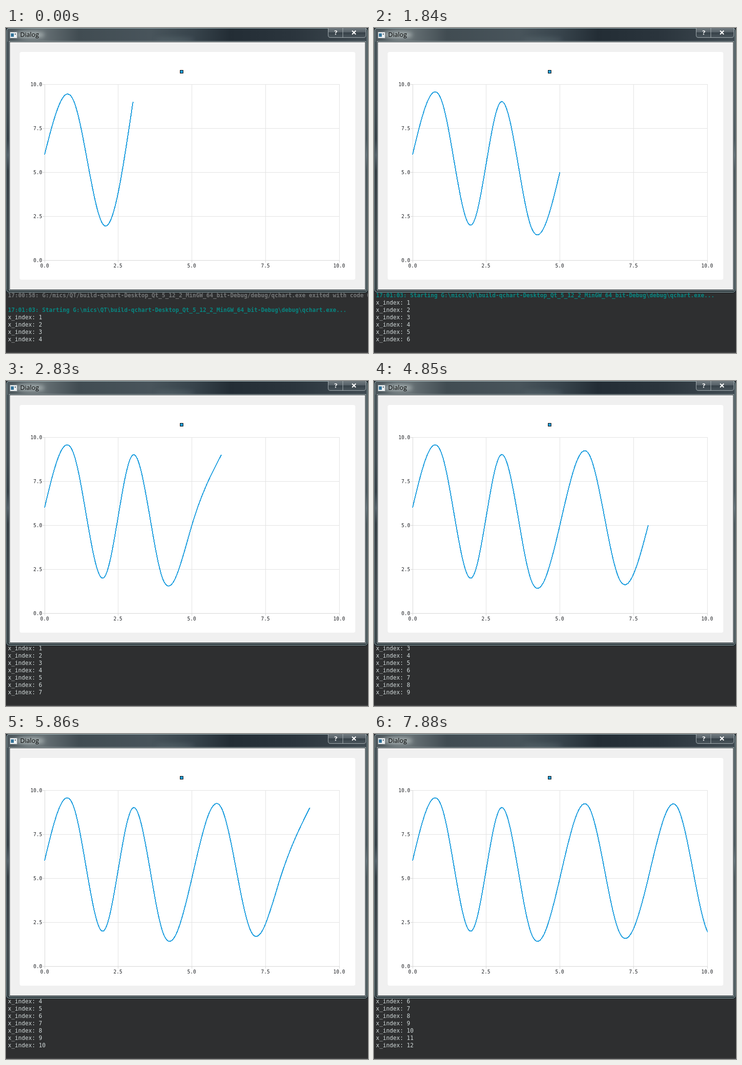
An HTML page that plays this animation: 741x665 px, repeating every 8 s.

```html
<!DOCTYPE html>
<html lang="en">
<head>
<meta charset="utf-8">
<title>Dialog</title>
<style>
  html, body { margin: 0; width: 100%; height: 100%; overflow: hidden; background: #2e2f30; }
  svg { display: block; }
  text { white-space: pre; }
  .log { font: 11.63px "DejaVu Sans Mono", monospace; fill: #d0d8d8; }
  .log .exit { font-weight: bold; fill: #747677; }
  .log .start { font-weight: bold; fill: #078681; }
  .axis text { font: 10px "DejaVu Sans Mono", monospace; fill: #202226; }
  .crisp { shape-rendering: crispEdges; }
</style>
</head>
<body>
<svg width="741" height="665" viewBox="0 0 741 665">
  <defs>
    <linearGradient id="titleGlass">
      <stop offset="0" stop-color="#4b565b"/>
      <stop offset=".1" stop-color="#667074"/>
      <stop offset=".2" stop-color="#414c52"/>
      <stop offset=".4" stop-color="#48545b"/>
      <stop offset=".52" stop-color="#37434b"/>
      <stop offset=".62" stop-color="#232d35"/>
      <stop offset=".8" stop-color="#2b353d"/>
      <stop offset="1" stop-color="#404b52"/>
    </linearGradient>
    <linearGradient id="sideGlass" x2="0" y2="1">
      <stop offset="0" stop-color="#3d484e"/>
      <stop offset=".3" stop-color="#333d43"/>
      <stop offset=".42" stop-color="#262f36"/>
      <stop offset=".48" stop-color="#49545c"/>
      <stop offset=".54" stop-color="#262e34"/>
      <stop offset=".8" stop-color="#343b40"/>
      <stop offset="1" stop-color="#2c373b"/>
    </linearGradient>
    <linearGradient id="button" x2="0" y2="1">
      <stop offset="0" stop-color="#737d82"/>
      <stop offset=".48" stop-color="#566067"/>
      <stop offset=".5" stop-color="#364148"/>
      <stop offset="1" stop-color="#4a555c"/>
    </linearGradient>
    <filter id="blur" x="-50%" y="-200%" width="200%" height="500%"><feGaussianBlur stdDeviation="4"/></filter>
    <filter id="softBlur" x="-50%" y="-200%" width="200%" height="500%"><feGaussianBlur stdDeviation="2"/></filter>
    <clipPath id="titleClip"><rect x="2" y="2" width="737" height="25"/></clipPath>
    <clipPath id="plotClip"><rect x="78" y="114" width="605" height="362"/></clipPath>
  </defs>

  <rect width="741" height="665" fill="#2e2f30"/>
  <rect y="663" width="741" height="2" fill="#414243"/>
  <g class="log" id="log"></g>

  <!-- Window frame: dark and light hairlines around the glass and the client area -->
  <rect width="741" height="542" fill="#242b30"/>
  <rect x=".5" y="-.5" width="740" height="542" rx="6" fill="url(#sideGlass)" stroke="#1a2125"/>
  <rect x="2" y="1" width="737" height="27" fill="url(#titleGlass)"/>
  <g clip-path="url(#titleClip)">
    <g filter="url(#blur)">
      <ellipse cx="49" cy="14" rx="30" ry="8" fill="#abb4b6" opacity=".85"/>
      <ellipse cx="345" cy="24" rx="40" ry="5" fill="#637078" opacity=".4"/>
    </g>
    <g filter="url(#softBlur)">
      <path d="M125 2H290" stroke="#20282d" stroke-width="9"/>
      <path d="M135 2H170M178 2H215M222 2H280" stroke="#aab1b4" stroke-width="3"/>
    </g>
  </g>
  <rect x="1.5" y=".5" width="738" height="540" rx="5" fill="none" stroke="#a3b9bb"/>
  <rect x="7.5" y="28.5" width="728" height="507" fill="#f0f0f0" stroke="#1d2529"/>
  <rect x="6.5" y="27.5" width="730" height="509" fill="none" stroke="#b4c0c2"/>

  <g class="crisp">
    <rect x="8" y="8" width="14" height="12" fill="#eef1f2" stroke="#a8b1b5"/>
    <rect x="10" y="11" width="6" height="7" fill="#337399"/>
    <rect x="18" y="11" width="2" height="3" fill="#63717a"/>
  </g>
  <text x="29" y="18" font-size="13" font-family="'Open Sans', sans-serif" fill="#000">Dialog</text>

  <path d="M659.5 -1V15Q659.5 19.5 664 19.5H732Q736.5 19.5 736.5 15V-1Z" fill="url(#button)" stroke="#a2abaf"/>
  <path d="M689.5 0V19" stroke="#a2abaf"/>
  <text x="675" y="14" text-anchor="middle" font-size="13" font-weight="700" font-family="'Open Sans', sans-serif" fill="#fff">?</text>
  <path d="M708.5 5.5L716 13M716 5.5L708.5 13" stroke="#fff" stroke-width="2.3"/>

  <!-- Chart -->
  <rect x="28" y="49" width="687" height="466" rx="4" fill="#fff"/>
  <rect class="crisp" x="356.5" y="86.5" width="6" height="6" fill="#209fdf" stroke="#000"/>
  <g class="axis" id="axis"></g>
  <path id="curve" class="crisp" clip-path="url(#plotClip)" fill="none" stroke="#209fdf" stroke-width="2"/>
</svg>
<script>
const values = [6, 9, 2, 9, 2, 5, 9, 2, 5, 9, 2, 5];
const stepTimes = [830, 1840, 2830, 3840, 4850, 5860, 6940, 7880];
const firstCount = 4, loop = 8000;
const build = 'build-qchart-Desktop_Qt_5_12_2_MinGW_64_bit-Debug';
const header = [
  ['exit', `17:00:58: G:/mics/QT/${build}/debug/qchart.exe exited with code 0`],
  ['', ''],
  ['start', `17:01:03: Starting G:\\mics\\QT\\${build}\\debug\\qchart.exe...`]
];
const byId = id => document.getElementById(id);
const px = x => 79 + 60.3 * x;
const py = y => 475 - 36 * y;

function buildAxes() {
  let grid = '', axes = '', labels = '';
  for (let i = 0; i < 5; i++) {
    const value = i * 2.5, text = value.toFixed(1);
    const x = Math.floor(px(value)) + .5, y = py(value) + .5;
    grid += `M${x} 115V475M79 ${y}H682`;
    axes += `M${x} 475V480M75 ${y}H79`;
    labels += `<text x="${x - .5}" y="490" text-anchor="middle">${text}</text>` +
      `<text x="74" y="${y + 3.5}" text-anchor="end">${text}</text>`;
  }
  axes += 'M79.5 115V475M79 475.5H683';
  byId('axis').innerHTML = `<path class="crisp" d="${grid}" stroke="#e2e2e2"/>` +
    `<path class="crisp" d="${axes}" stroke="#d6d6d6"/>${labels}`;
}

// First Bezier handles of a natural cubic spline, by tridiagonal elimination.
function firstHandles(p) {
  const n = p.length - 1, handles = [], ratios = [];
  let pivot = 2;
  handles[0] = (p[0] + 2 * p[1]) / pivot;
  for (let i = 1; i < n; i++) {
    const last = i === n - 1;
    const rhs = last ? (8 * p[i] + p[n]) / 2 : 4 * p[i] + 2 * p[i + 1];
    ratios[i] = 1 / pivot;
    pivot = (last ? 3.5 : 4) - ratios[i];
    handles[i] = (rhs - handles[i - 1]) / pivot;
  }
  for (let i = n - 1; i > 0; i--) handles[i - 1] -= ratios[i] * handles[i];
  return handles;
}

function splinePath(p) {
  const n = p.length - 1, h = firstHandles(p);
  let d = `M${px(0)} ${py(p[0])}`;
  for (let i = 0; i < n; i++) {
    const second = i < n - 1 ? 2 * p[i + 1] - h[i + 1] : (p[n] + h[i]) / 2;
    d += `C${px(i + 1 / 3)} ${py(h[i])} ${px(i + 2 / 3)} ${py(second)} ${px(i + 1)} ${py(p[i + 1])}`;
  }
  return d;
}

function show(count) {
  byId('curve').setAttribute('d', splinePath(values.slice(0, count)));
  const lines = [...header];
  for (let i = 1; i <= count; i++) lines.push(['', `x_index: ${i}`]);
  byId('log').innerHTML = lines.slice(-7).map(([kind, text], i) =>
    `<text class="${kind}" x="4" y="${551 + 15 * i}">${text}</text>`).join('');
}

let shown = 0;
function frame() {
  const time = performance.now() % loop;
  const count = firstCount + stepTimes.filter(t => t <= time).length;
  if (count !== shown) show(shown = count);
  requestAnimationFrame(frame);
}

buildAxes();
frame();
</script>
</body>
</html>
```
